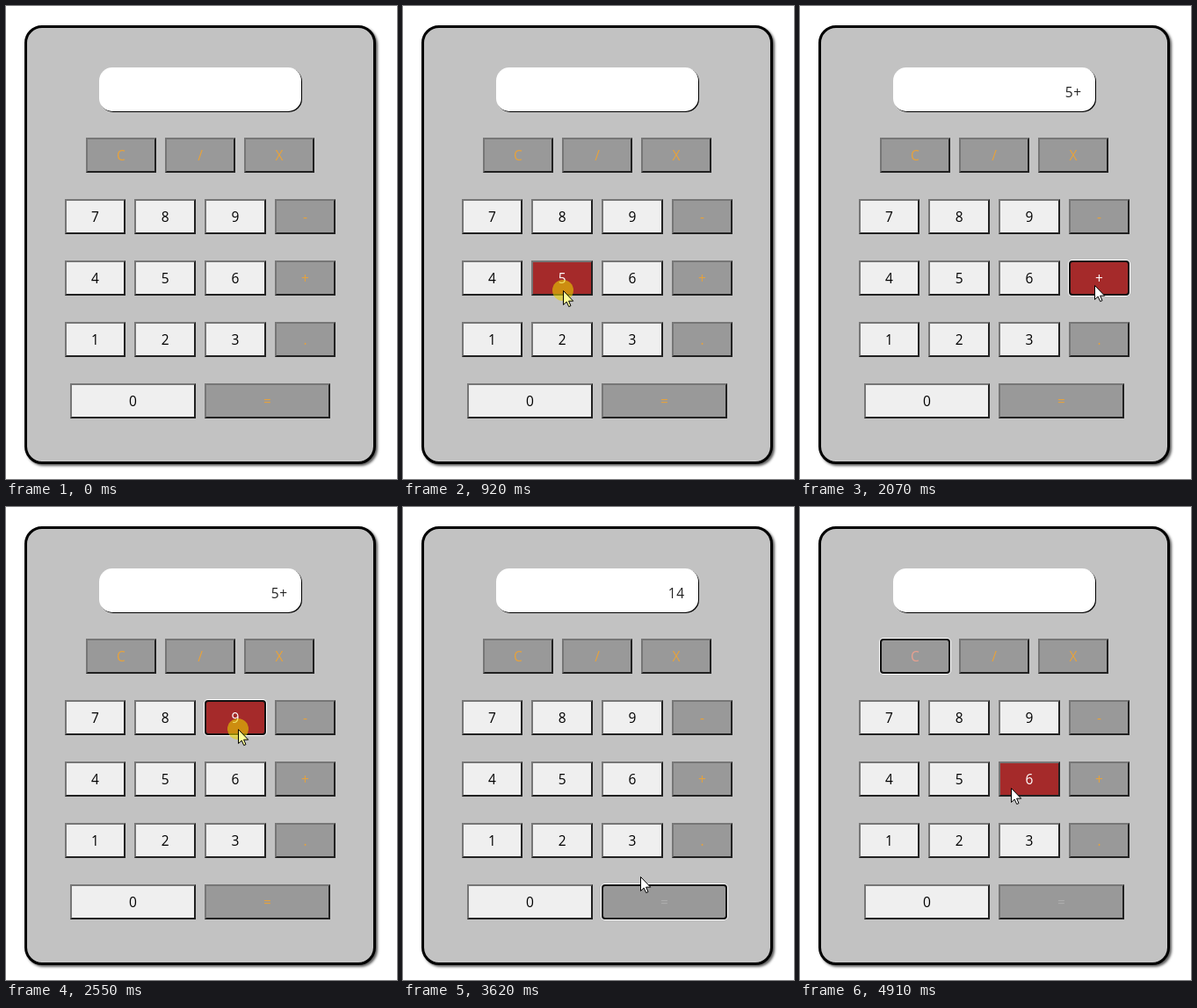
Recreate the animation shown at these times as an HTML page. Size 445 px wide and 539 px high, loop 6.23 s.

```html
<!DOCTYPE html>
<html lang="en">
<head>
<meta charset="utf-8">
<title>Calculator</title>
<style>
  html, body { margin: 0; width: 100%; height: 100%; overflow: hidden; background: #fff; }
  body { position: relative; font: 15.5px "Open Sans", "Noto Sans", sans-serif; }
  #case, #screen, #readout, .row, #pointer { position: absolute; box-sizing: border-box; }
  #case {
    left: 21px; top: 22px; width: 400px; height: 500px;
    border: 3px solid #000; border-radius: 20px;
    background: #c2c2c2; box-shadow: 2px 2px 3px rgba(0, 0, 0, .65);
  }
  #screen {
    left: 106px; top: 70px; width: 230px; height: 50px;
    border-radius: 15px; background: #fff; box-shadow: 1px 1px #000;
  }
  #readout { right: 15.5px; top: 17px; line-height: 22px; letter-spacing: .5px; color: #222; }
  .row { left: 21px; width: 400px; height: 40px; display: flex; justify-content: center; gap: 10px; }
  .key {
    box-sizing: border-box; display: flex; align-items: center; justify-content: center;
    border: 2px solid; border-color: #767676 #212121 #212121 #767676;
    background: #efefef; color: #000;
  }
  .key.op { background: #999; color: #e6a23c; }
  .key.focus { border-color: #101010; border-radius: 4px; box-shadow: 0 0 0 1px #fff; }
  .key.hover { background: #a52a2a; color: #fff !important; }
  #pointer { left: 0; top: 0; width: 1px; height: 1px; overflow: visible; }
</style>
</head>
<body>
<div id="case"></div>
<div id="screen"><div id="readout"></div></div>
<svg id="pointer">
  <circle id="halo" r="12" fill="#e8d000" fill-opacity=".6"/>
  <path id="arrow" d="M.5 .5V16.5L4.2 13.1 6.7 18.6 9 17.6 6.6 12.2H11.7Z" stroke="#000"/>
</svg>
<script>
const LOOP = 6230, STEP = 70, RELEASE = 2 * STEP;
const $ = id => document.getElementById(id);
const pointer = $('pointer'), halo = $('halo'), arrow = $('arrow'), readout = $('readout');

const start = { x: 352, y: 497 };
// The pointer travels to each key between leave and arrive, then may press it.
const stops = [
  { key: '5', x: 182, y: 324, leave: 190, arrive: 460, press: 920 },
  { key: '+', x: 335, y: 318, leave: 1470, arrive: 1655, press: 1820 },
  { key: '9', x: 264, y: 253, leave: 2210, arrive: 2420, press: 2480 },
  { key: '=', x: 282, y: 441, leave: 2750, arrive: 2980, press: 3350 },
  { key: 'C', x: 118, y: 167, leave: 3550, arrive: 3970, press: 4170 },
  { key: '6', x: 240, y: 320, leave: 4490, arrive: 4910, press: Infinity }
];
const usedColor = { 'C': '#e8a090', '=': '#adadad' };

const keys = ['C/X', '789-', '456+', '123.', '0='].flatMap((labels, i) => {
  const row = document.createElement('div');
  row.className = 'row';
  row.style.top = 150 + 70 * i + 'px';
  document.body.insertBefore(row, pointer);
  const width = { 2: 143, 3: 80, 4: 69.67 }[labels.length];
  return [...labels].map(label => {
    const el = document.createElement('div');
    el.className = /\d/.test(label) ? 'key' : 'key op';
    el.textContent = label;
    el.style.width = width + 'px';
    row.append(el);
    return { el, label };
  });
});

const smooth = u => u * u * (3 - 2 * u);
const mix = (a, b, u) => a + (b - a) * u;

function progress({ leave, arrive }, t) {
  const elapsed = Math.floor((t - leave) / STEP) * STEP;
  return smooth(t >= arrive ? 1 : elapsed / (arrive - leave));
}

function enter(text, key) {
  if (key === 'C') return '';
  if (key === '=') return String(text.split('+').reduce((sum, n) => sum + Number(n), 0));
  return text + key;
}

function draw(t) {
  const begun = stops.filter(stop => t >= stop.leave);
  const stop = begun.at(-1), from = begun.at(-2) || start;
  const moved = stop ? progress(stop, t) : 0;
  const hover = moved > .9 ? stop.key : moved === 0 ? from.key : '';
  const focus = stops.findLast(s => t >= s.press + STEP)?.key;
  const down = stops.some(s => t >= s.press && t < s.press + RELEASE);
  const used = begun.slice(0, -1).map(s => s.key);

  for (const { el, label } of keys) {
    el.classList.toggle('hover', label === hover);
    el.classList.toggle('focus', label === focus);
    el.style.color = used.includes(label) && usedColor[label] || '';
  }
  readout.textContent = stops
    .filter(s => t >= s.press + RELEASE)
    .reduce((text, s) => enter(text, s.key), '');

  pointer.style.display = stop ? '' : 'none';
  if (stop) {
    const x = mix(from.x, stop.x, moved), y = mix(from.y, stop.y, moved);
    pointer.style.transform = `translate(${Math.round(x)}px, ${Math.round(y)}px)`;
  }
  halo.style.display = down ? '' : 'none';
  arrow.setAttribute('fill', down ? '#ffff99' : '#fff');
}

function tick() {
  draw(performance.now() % LOOP);
  requestAnimationFrame(tick);
}
draw(0);
requestAnimationFrame(tick);
</script>
</body>
</html>
```
